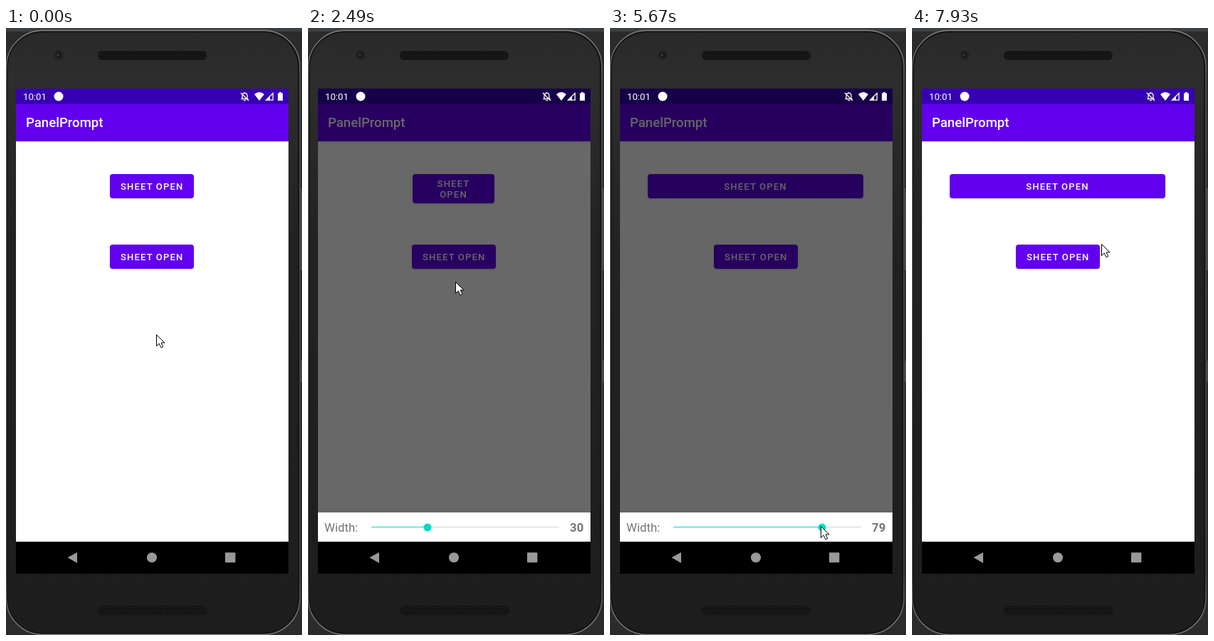
Animation, 416 px wide and 852 px high, one loop 8 s. Source, as an HTML page:

```html
<!DOCTYPE html>
<html lang="en">
<head>
<meta charset="utf-8">
<title>Sheet demo</title>
<style>
  html, body { margin: 0; width: 100%; height: 100%; overflow: hidden; background: #2b2b2b; }
  #stage { position: relative; width: 416px; height: 852px; overflow: hidden; font-family: Roboto, sans-serif; }
  #stage div, #stage svg { position: absolute; }
  #stage > svg { left: 0; top: 0; }
  #screen { inset: 0; clip-path: inset(85px 19px 86px 14px); background: #fff; }
  .bar { left: 14px; width: 383px; }
  #status { top: 85px; height: 22px; background: #3700b3; }
  #appbar { top: 107px; height: 52px; background: #6200ee; box-shadow: 0 1px 2px #0003;
    color: #fff; font: 500 18.6px/53px Roboto, sans-serif; text-indent: 14px; }
  .button { box-sizing: border-box; min-height: 34px; padding: 6px 15px 5px; border-radius: 4px;
    display: flex; align-items: center; justify-content: center; text-align: center;
    background-color: #6200ee; box-shadow: 0 1px 2px #0003; color: #fff;
    font: 500 13.05px/15px Roboto, sans-serif; letter-spacing: 1.16px; }
  .button span { min-width: 0; overflow-wrap: anywhere; }
  #first { top: 205px; }
  #second { top: 304px; left: 146px; width: 118px; white-space: nowrap; }
  #dim { top: 85px; height: 636px; background: #000; }
  #nav { top: 721px; height: 45px; background: #000; }
  #sheet { top: 680px; height: 41px; background: #fff; color: #757575;
    font: 16.8px/42px Roboto, sans-serif; }
  #label { left: 9px; }
  #number { left: 354px; font-weight: 700; }
  .track { top: 20px; left: 75px; height: 1px; }
  #rest { width: 264px; background: #d4d4d4; }
  #fill { background: #03dac5; }
  #thumb { top: 20.5px; border-radius: 50%; background: #03dac5; transform: translate(-50%, -50%); }
</style>
</head>
<body>
<div id="stage">
  <svg width="416" height="852">
    <defs>
      <linearGradient id="body" x2="0" y2="1">
        <stop offset="0" stop-color="#292929"/>
        <stop offset=".08" stop-color="#2d2d2d"/>
        <stop offset=".35" stop-color="#222"/>
        <stop offset="1" stop-color="#1d1d1d"/>
      </linearGradient>
      <linearGradient id="rim" x2="0" y2="1">
        <stop offset="0" stop-color="#858585"/>
        <stop offset=".09" stop-color="#555"/>
        <stop offset=".9" stop-color="#444"/>
        <stop offset="1" stop-color="#858585"/>
      </linearGradient>
      <pattern id="mesh" width="3" height="3" patternUnits="userSpaceOnUse">
        <rect width="3" height="3" fill="#1b1b1b"/>
        <circle cx="1.5" cy="1.5" r="1" fill="#0a0a0a"/>
      </pattern>
    </defs>
    <rect width="416" height="852" fill="#2b2b2b"/>
    <rect width="416" height="5" fill="#3c4043"/>
    <path d="M415 225V340M415 467V497" stroke="#484848" stroke-width="2"/>
    <rect x=".5" y="3.5" width="412.5" height="848" rx="51" fill="#151515" stroke="url(#rim)" stroke-width="1.5"/>
    <rect x="3" y="6.5" width="407" height="842" rx="48" fill="url(#body)"/>
    <circle cx="74" cy="38" r="7" fill="#242424"/>
    <circle cx="74" cy="38" r="4.5" fill="#1a1a1a"/>
    <circle cx="73" cy="38" r="2" fill="#303336"/>
    <rect x="129" y="32" width="153" height="13" rx="6" fill="url(#mesh)"/>
    <rect x="129" y="811" width="154" height="13" rx="6" fill="url(#mesh)"/>
  </svg>

  <div id="screen">
    <div id="appbar" class="bar">PanelPrompt</div>
    <div id="status" class="bar"></div>
    <div id="first" class="button"><span>SHEET OPEN</span></div>
    <div id="second" class="button"><span>SHEET OPEN</span></div>
    <div id="dim" class="bar"></div>
    <div id="nav" class="bar"></div>
    <svg width="416" height="852" fill="#fff">
      <text x="24" y="101" font-size="13.2" font-family="Roboto, sans-serif">10:01</text>
      <circle cx="74" cy="96" r="6.5"/>
      <g fill="none" stroke="#fff" stroke-width="1.3">
        <path d="M332 99.5V95q0-3.6 3.5-3.6T339 95v4.5M330.5 99.5h10M330 91l11 11M335.5 90v1.5M334 101.7h3"/>
        <path d="M365.5 101.2H375.2V91.5Z"/>
      </g>
      <path d="M349 93q7-6 14 0L356 102ZM371 95.5V101.5H365Z"/>
      <path d="M382 91.5h2V90h3v1.5h2V102h-7Z"/>
      <g fill="#999">
        <path d="M86.5 743.3L100 736v15Z"/>
        <circle cx="205" cy="743.3" r="7"/>
        <rect x="308" y="736.3" width="14.4" height="14" rx="1"/>
      </g>
    </svg>
    <div id="sheet" class="bar">
      <div id="label">Width:</div>
      <div id="rest" class="track"></div>
      <div id="fill" class="track"></div>
      <div id="thumb"></div>
      <div id="number"></div>
    </div>
  </div>

  <svg id="cursor" width="16" height="22" viewBox="-.5 -.5 16 22">
    <path d="M0 0V16L3.7 12.5L6.5 18.3L9.3 17L6.6 11.4H11.5Z" fill="#fff" stroke="#000"/>
  </svg>
</div>

<script>
const LOOP = 8000;
const el = Object.fromEntries([...document.querySelectorAll('[id]')].map(node => [node.id, node]));

const ramp = (t, start, end) => Math.min(1, Math.max(0, (t - start) / (end - start)));
const smooth = p => p * p * (3 - 2 * p);
const pulse = (t, inStart, inEnd, outStart, outEnd) => ramp(t, inStart, inEnd) - ramp(t, outStart, outEnd);

// Each hand movement eases to a resting place, bowing sideways on the way.
const moves = [
  { from: 790, to: 1460, x: 212, y: 224, bow: 14 },
  { from: 2250, to: 2680, x: 204, y: 447, bow: 0 },
  { from: 2700, to: 3510, x: 155, y: 694, bow: -20 },
  { from: 3590, to: 3710, x: 125, y: 699, bow: 0 },
  { from: 4120, to: 4670, x: 232, y: 707, bow: 0 },
  { from: 4690, to: 5060, x: 296, y: 699, bow: 0 },
  { from: 6370, to: 7110, x: 286, y: 618, bow: -14 },
  { from: 7240, to: 7930, x: 266, y: 303, bow: 12 }
];

function pointerAt(t) {
  let x = 211, y = 430;
  for (const move of moves) {
    const p = smooth(ramp(t, move.from, move.to));
    x += (move.x - x) * p + move.bow * Math.sin(Math.PI * p);
    y += (move.y - y) * p;
  }
  return [x, y].map(Math.round);
}

function drawButton(t, value) {
  const width = t < 2100 ? 118 : Math.round(3.835 * value);
  const left = Math.floor(205 - width / 2);
  const pressed = t >= 1930 && t < 2340;
  const radius = pressed ? (t - 1930) * .31 : 0;
  const light = `rgba(255,255,255,${.26 * (1 - ramp(t, 2180, 2340))})`;
  Object.assign(el.first.style, {
    left: left + 'px',
    width: width + 'px',
    whiteSpace: width >= 118 ? 'nowrap' : 'normal',
    boxShadow: pressed ? '0 2px 5px #0005' : '',
    backgroundImage: pressed
      ? `radial-gradient(circle at ${213 - left}px 20px, ${light} ${radius}px, transparent ${radius + 1}px)`
      : 'none'
  });
}

function drawSheet(t, value) {
  const shown = smooth(pulse(t, 2170, 2420, 7270, 7480));
  el.dim.style.opacity = .6 * pulse(t, 2215, 2495, 7270, 7550);
  el.sheet.style.opacity = shown;
  el.sheet.style.transform = `translateY(${Math.round(127 * (1 - shown))}px)`;

  const size = 11 + 5 * pulse(t, 3870, 3980, 5560, 5670) + 'px';
  el.fill.style.width = 2.64 * value + 'px';
  Object.assign(el.thumb.style, { left: 75 + 2.64 * value + 'px', width: size, height: size });
  el.number.textContent = value;
}

function draw(t) {
  const value = Math.round(30 - 18 * ramp(t, 3870, 3980) + 36 * ramp(t, 4120, 4670) + 31 * ramp(t, 5190, 5600));
  const [x, y] = pointerAt(t);
  el.cursor.style.transform = `translate(${x}px, ${y}px)`;
  drawButton(t, value);
  drawSheet(t, value);
}

function frame() {
  draw(performance.now() % LOOP);
  requestAnimationFrame(frame);
}
frame();
</script>
</body>
</html>
```
